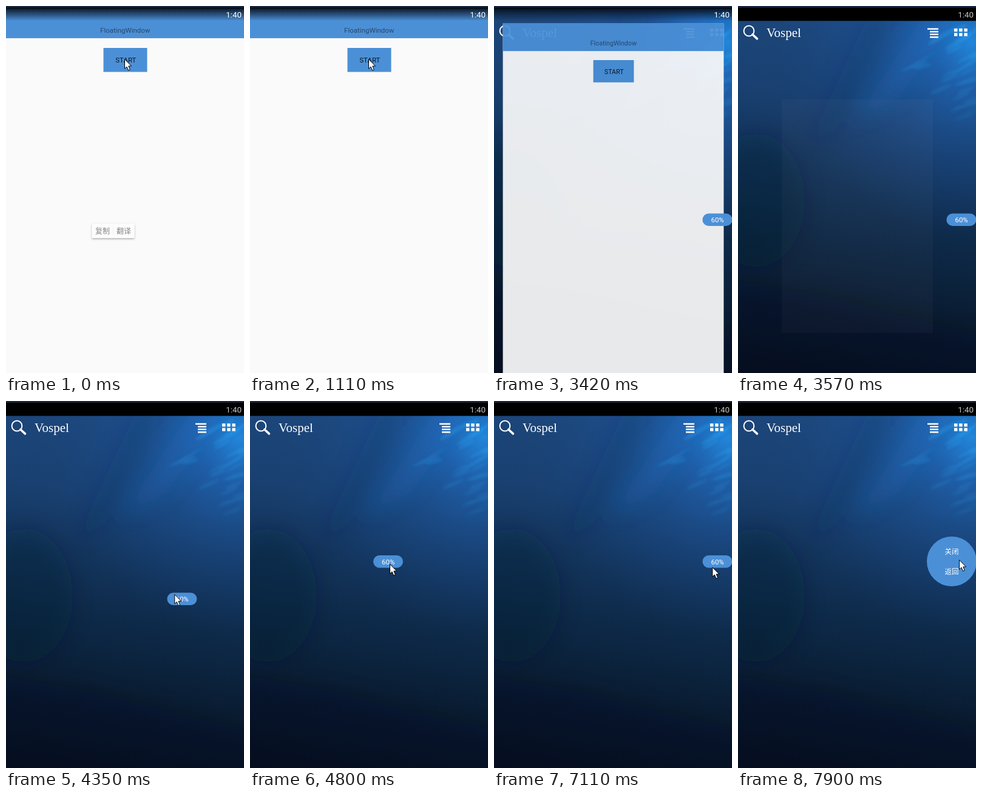
Write an HTML page that moves like this. It is 392 by 604 pixels and loops after 8000 ms.

```html
<!DOCTYPE html>
<html lang="en">
<head>
<meta charset="utf-8">
<title>Floating window demo</title>
<style>
html, body { margin: 0; width: 100%; height: 100%; overflow: hidden; background: #07131f; }
svg { display: block; width: 392px; height: 604px; }
text { font-family: Roboto, "Noto Sans CJK SC", "Noto Sans CJK", sans-serif; font-size: 11.5px; }
.mid { text-anchor: middle; }
.brand { font-family: "Liberation Serif", serif; font-size: 21px; }
</style>
</head>
<body>
<svg viewBox="0 0 392 604" xmlns="http://www.w3.org/2000/svg">
  <defs>
    <linearGradient id="sea" x1=".1" y1="0" x2="0" y2="1">
      <stop offset="0" stop-color="#1d477c"/>
      <stop offset=".22" stop-color="#194070"/>
      <stop offset=".4" stop-color="#13345b"/>
      <stop offset=".58" stop-color="#0d2846"/>
      <stop offset=".75" stop-color="#0a1d33"/>
      <stop offset="1" stop-color="#07131f"/>
    </linearGradient>
    <radialGradient id="sun" gradientUnits="userSpaceOnUse" cx="385" cy="60" r="320">
      <stop offset="0" stop-color="#2292ec" stop-opacity=".85"/>
      <stop offset=".22" stop-color="#2270c8" stop-opacity=".62"/>
      <stop offset=".5" stop-color="#1f5ca8" stop-opacity=".38"/>
      <stop offset="1" stop-color="#174a8c" stop-opacity="0"/>
    </radialGradient>
    <linearGradient id="shade" x1="0" y1="0" x2="0" y2="1">
      <stop offset="0" stop-color="#050a14" stop-opacity=".9"/>
      <stop offset=".5" stop-color="#0a1626" stop-opacity=".5"/>
      <stop offset="1" stop-color="#0a1626" stop-opacity="0"/>
    </linearGradient>
    <filter id="soft" x="-40%" y="-40%" width="180%" height="180%"><feGaussianBlur stdDeviation="16"/></filter>
    <filter id="fine" x="-30%" y="-30%" width="160%" height="160%"><feGaussianBlur stdDeviation="2"/></filter>
    <filter id="drop" x="-20%" y="-40%" width="140%" height="190%"><feDropShadow dx="0" dy="1.5" stdDeviation="1.6" flood-color="#000" flood-opacity=".32"/></filter>
  </defs>

  <g id="home">
    <rect y="4" width="392" height="600" fill="url(#sea)"/>
    <rect y="4" width="392" height="600" fill="url(#sun)"/>
    <g filter="url(#soft)">
      <path d="M310 10 H365 L265 150 L190 190Z" fill="#2a74cc" opacity=".28"/>
      <path d="M215 15 H260 L165 200 L110 240Z" fill="#0f2b55" opacity=".18"/>
      <ellipse cx="30" cy="320" rx="80" ry="110" fill="#071830" opacity=".3"/>
      <path d="M-40 450 L130 475 L430 550 V640 H-40Z" fill="#07111a" opacity=".25"/>
    </g>
    <g id="glints" filter="url(#fine)"></g>
    <g fill="#fff">
      <circle cx="18" cy="41" r="8.4" fill="none" stroke="#fff" stroke-width="2"/>
      <path d="M24 47 L31.5 53.8" stroke="#fff" stroke-width="3.6" stroke-linecap="round"/>
      <text class="brand" x="47" y="51">Vospel</text>
      <g id="icons"></g>
    </g>
    <rect id="ghost" x="72" y="154" width="249" height="384" fill="#cfc8c4" opacity=".035"/>
  </g>

  <g id="app">
    <rect y="4" width="392" height="800" fill="#fafafa"/>
    <rect y="4" width="392" height="49" fill="#4b90d7"/>
    <text class="mid" x="196.3" y="43.5" fill="#28486c">FloatingWindow</text>
    <rect x="160.5" y="69" width="72" height="39.5" fill="#4b90d7"/>
    <text class="mid" x="197.3" y="93.3" fill="#0c1622">START</text>
  </g>

  <g id="menu">
    <rect x="141.5" y="358" width="70" height="24" rx="1.5" fill="#fcfcfc" filter="url(#drop)"/>
    <path d="M176.5 364 V376" stroke="#eee"/>
    <g id="menuText" fill="#858585">
      <text x="147" y="374.5" style="font-size:12px">复制</text>
      <text x="182" y="374.5" style="font-size:12px">翻译</text>
    </g>
  </g>

  <rect id="bar" y="4" width="392" height="20.5"/>
  <rect width="392" height="3" fill="#1a2840"/>
  <rect y="2.5" width="392" height="1.5" fill="#04070c"/>
  <text id="clock" x="388" y="19" text-anchor="end" style="font-size:13.4px">1:40</text>

  <g id="pill">
    <rect width="49" height="20.5" rx="10.2" fill="#4b90d7"/>
    <text class="mid" x="24.7" y="14.6" fill="#fff">60%</text>
  </g>

  <g id="disc" fill="#fff">
    <circle cx="352" cy="264" r="41" fill="#4b90d7"/>
    <text class="mid" x="352" y="252">关闭</text>
    <text class="mid" x="352" y="284.7">返回</text>
  </g>

  <path id="cursor" d="M.5 .7 V16.2 L4 12.9 L6.6 19 L9.3 17.9 L6.8 11.9 H11.6Z" fill="#fff" stroke="#000" stroke-linejoin="round"/>
</svg>
<script>
const $ = id => document.getElementById(id);
const LOOP = 8000, TICK = 138, EARLY = 25;

function add(parent, tag, attrs) {
  const el = document.createElementNS("http://www.w3.org/2000/svg", tag);
  for (const k in attrs) el.setAttribute(k, attrs[k]);
  parent.appendChild(el);
}

// Launcher icons
for (let i = 0; i < 4; i++)
  add($("icons"), "rect", { x: i ? 316 : 312, y: 36.5 + i * 4.5, width: i ? 14 : 18, height: 2.5 });
for (let i = 0; i < 6; i++)
  add($("icons"), "rect", { x: 356 + i % 3 * 8.2, y: 37 + (i > 2) * 7.4, width: 5.4, height: 5.2 });

// Light ripples near the surface
let seed = 11;
const rnd = () => (seed = seed * 16807 % 2147483647) / 2147483647;
for (let i = 0; i < 30; i++) {
  const x = 392 - 110 * rnd() * rnd(), y = 35 + 150 * rnd();
  add($("glints"), "ellipse", {
    cx: x, cy: y, rx: 10 + 18 * rnd(), ry: 1.5 + 2.5 * rnd(), fill: "#2fb0ff",
    opacity: 0.35 * (1 - y / 210),
    transform: `rotate(${-15 - 20 * rnd()} ${x} ${y})`
  });
}

// Share of a stroke done after whole ticks; lead shifts it ahead by part of a tick
function steps(t, t0, n, lead = 0) {
  if (t < t0) return 0;
  return Math.min(1, (Math.floor((t - t0 + EARLY) / TICK) + 1 + lead) / n);
}
const easeX = p => p * (2 - p);
const easeY = p => 1 - (1 - p * p) ** 3;
const mix = (a, b, p) => a + (b - a) * p;
const between = (t, a, b) => t >= a && t < b;

// Pointer strokes: start, ticks, end point
const strokes = [
  [0, 1, 195, 87], [1700, 1, 195, 84], [2210, 1, 195, 87],
  [3960, 1, 369, 356], [4110, 6, 230, 268], [4920, 1, 230, 280],
  [5170, 1, 247, 281], [5320, 1, 380, 233], [5470, 4, 372, 263],
  [6290, 2, 355, 298], [6560, 2, 352, 280], [7110, 4, 364, 261]
];

function pointer(t) {
  let x = 0, y = 0;
  for (const [t0, n, x1, y1] of strokes) {
    const p = steps(t, t0, n, .5);
    x = mix(x, x1, easeX(p));
    y = mix(y, y1, easeY(p));
  }
  return [x, y];
}

// The pill follows the drag, then snaps back to the right edge
function pillAt(t) {
  const p = steps(t, 4110, 6);
  return [t < 4920 ? mix(343.4, 203, easeX(p)) : 343.4, mix(341.6, 254, easeY(p))];
}

const show = (id, on) => $(id).setAttribute("display", on ? "inline" : "none");
const move = (id, [x, y]) => $(id).setAttribute("transform", `translate(${x} ${y})`);

function draw(t) {
  const inApp = t < 3420, leaving = between(t, 3420, 3570);
  show("home", !inApp);
  show("app", inApp || leaving);
  $("app").setAttribute("transform", leaving ? "translate(14.6 25) scale(.928)" : "");
  $("app").setAttribute("opacity", leaving ? .93 : 1);
  show("ghost", between(t, 3570, 3690));
  $("bar").setAttribute("fill", t < 3570 ? "url(#shade)" : "#000");
  $("clock").setAttribute("fill", t < 3570 ? "#fff" : "#c4c4c4");

  show("menu", t < 1110);
  $("menuText").setAttribute("opacity", t < 420 ? 1 : .8);

  show("pill", between(t, 1700, 5890) || between(t, 7110, 7900));
  $("pill").setAttribute("opacity", steps(t, 1700, 3));
  move("pill", pillAt(t));
  show("disc", between(t, 5890, 7110) || t >= 7900);
  show("cursor", !between(t, 2360, 3960));
  move("cursor", pointer(t));
}

const start = performance.now();
function tick() {
  draw((performance.now() - start) % LOOP);
  requestAnimationFrame(tick);
}
tick();
</script>
</body>
</html>
```
